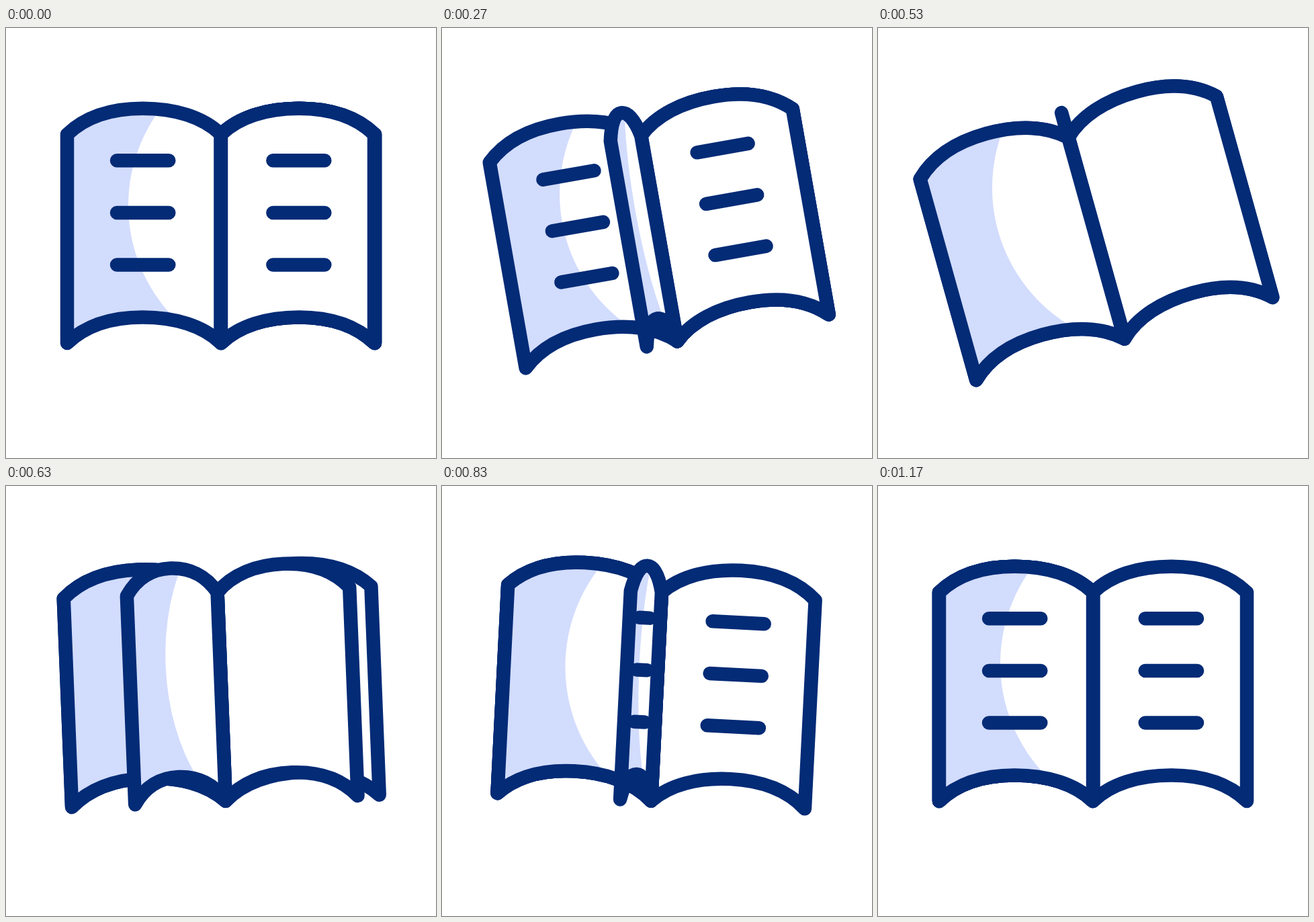
Recreate the animation shown at these times as an HTML page with a canvas. Size 640x640 px, loop 1500 ms.

```html
<!DOCTYPE html>
<html lang="en">
<head>
<meta charset="utf-8">
<title>Turning pages</title>
<style>
  html, body { margin: 0; width: 100%; height: 100%; overflow: hidden; background: #fff; }
  canvas { display: block; width: 640px; height: 640px; }
</style>
</head>
<body>
<canvas id="stage" width="640" height="640"></canvas>
<script>
const ctx = document.getElementById('stage').getContext('2d');
const NAVY = '#032b76', SHADE = '#d2dcfd', WHITE = '#fff';
const LOOP = 1500, FPS = 30, LAST_STEP = 35;
const PIVOT = { x: 320, y: 295 };

// Page outline relative to the pivot; the spine is at x = 0.
const EDGE = 229, TOP = -136.7, BOTTOM = 174, RISE = 38.6, CREST = 116.5;
// Curve handles: horizontal at the crest, sloping at both ends.
const CREST_PULL = 48, END_PULL = { x: 27, y: 26 };

// Rocking of the book: step, degrees, slope.
const ROCK = [
  [0, 0, -0.3], [5, -5, -1.6], [11, -15, -1.6], [14, -18.4, 0], [16, -15.6, 2.8],
  [22, 6.85, 0], [28, -2.4, -0.9], [29.8, -3.1, 0], [32, -2.2, 0.8], [35, 0, 0]
];

// Turning pages, from the top of the right-hand pile down.
const PAGES = [
  { start: -0.4, length: 14.8, front: true, back: false },
  { start: 8.8, length: 14.4, front: true, back: false },
  { start: 16.6, length: 14.8, front: false, back: true }
];

const clamp01 = v => Math.min(1, Math.max(0, v));
const smooth = v => v * v * (3 - 2 * v);

function rockAngle(step) {
  const i = Math.max(1, ROCK.findIndex(key => step <= key[0]));
  const [t0, a0, m0] = ROCK[i - 1], [t1, a1, m1] = ROCK[i];
  const span = t1 - t0, u = (step - t0) / span, s = smooth(u);
  return a0 + (a1 - a0) * s + span * u * (1 - u) * (m0 * (1 - u) - m1 * u);
}

// 1 lies flat on the right, -1 flat on the left.
function pageWidth(page, step) {
  const w = 1 - 2 * smooth(clamp01((step - page.start) / page.length));
  return Math.abs(w) < 0.002 ? 0.002 : w;
}

// Runs a path builder in horizontally scaled space, keeping stroke widths even.
function squeezed(width, build) {
  ctx.save();
  ctx.scale(width, 1);
  ctx.beginPath();
  build();
  ctx.restore();
}

// Arched page border from one end to the other, starting at the current point.
function arch(from, to, y) {
  const dir = Math.sign(to - from), crestY = y - RISE;
  const end = END_PULL.x * dir, pull = CREST_PULL * dir;
  ctx.bezierCurveTo(from + end, y - END_PULL.y, CREST - pull, crestY, CREST, crestY);
  ctx.bezierCurveTo(CREST + pull, crestY, to - end, y - END_PULL.y, to, y);
}

function outline() {
  ctx.moveTo(0, TOP);
  arch(0, EDGE, TOP);
  ctx.lineTo(EDGE, BOTTOM);
  arch(EDGE, 0, BOTTOM);
  ctx.closePath();
}

function textLines() {
  for (const y of [-97.7, -20, 57.4]) {
    ctx.moveTo(77.7, y);
    ctx.lineTo(155, y);
  }
}

function drawPage(width, lined) {
  const onLeft = width < 0;
  squeezed(width, outline);
  ctx.fillStyle = onLeft ? SHADE : WHITE;
  ctx.fill();
  if (onLeft) {
    ctx.save();
    ctx.clip();
    squeezed(width, () => ctx.arc(-102, -31, 240, 0, 2 * Math.PI));
    ctx.fillStyle = WHITE;
    ctx.fill();
    ctx.restore();
  }
  squeezed(width, outline);
  ctx.stroke();
  if (lined) {
    squeezed(width, textLines);
    ctx.stroke();
  }
}

function draw(step) {
  ctx.setTransform(1, 0, 0, 1, 0, 0);
  ctx.fillStyle = WHITE;
  ctx.fillRect(0, 0, 640, 640);
  ctx.translate(PIVOT.x, PIVOT.y);
  ctx.rotate(rockAngle(step) * Math.PI / 180);
  ctx.strokeStyle = NAVY;
  ctx.lineWidth = 20.5;
  ctx.lineCap = ctx.lineJoin = 'round';

  drawPage(-1, true);
  drawPage(1, true);
  const turning = PAGES.map(page => ({ ...page, width: pageWidth(page, step) }));
  // An edge-on page shows no lines.
  const lined = (p, side) => side && Math.abs(p.width) > 0.01;
  turning.filter(p => p.width > 0).reverse().forEach(p => drawPage(p.width, lined(p, p.front)));
  turning.filter(p => p.width < 0).forEach(p => drawPage(p.width, lined(p, p.back)));
}

const origin = performance.now();
function tick() {
  const time = (performance.now() - origin) % LOOP;
  // The motion advances in whole steps and then rests until the loop restarts.
  draw(Math.min(LAST_STEP, Math.floor(time * FPS / 1000 + 0.11)));
  requestAnimationFrame(tick);
}
tick();
</script>
</body>
</html>
```
